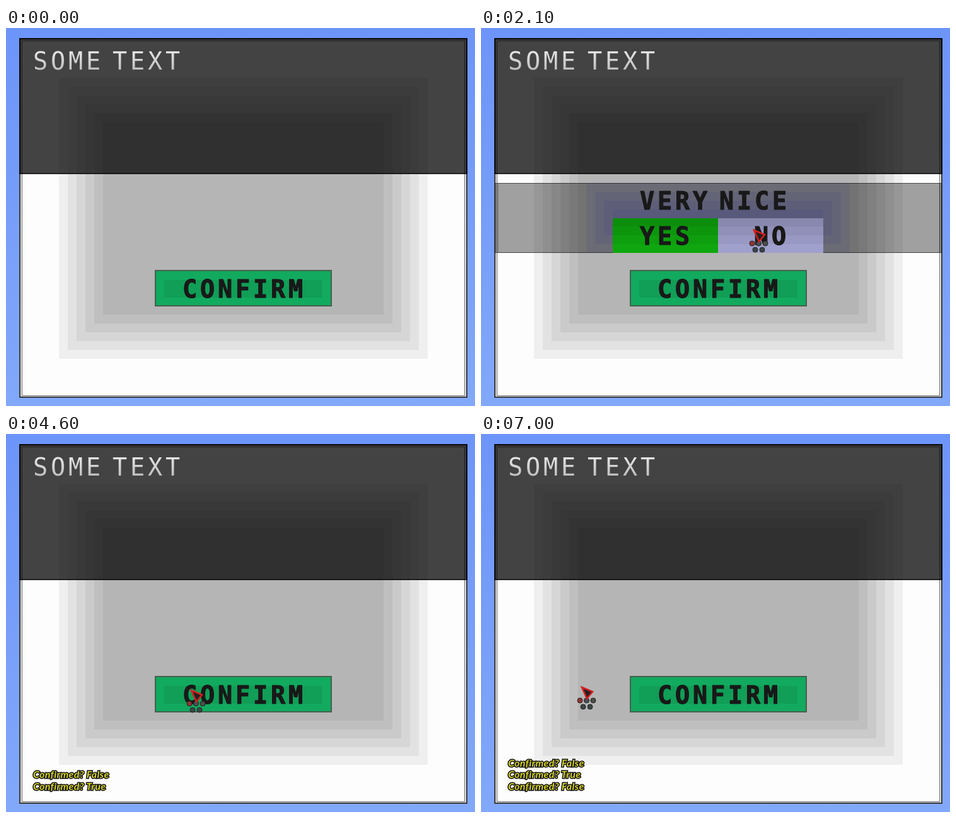
Write an HTML page that moves like this. It is 744 px wide and 600 px high and loops after 7.1 s.

```html
<!DOCTYPE html>
<html lang="en">
<head>
<meta charset="utf-8">
<style>
  html, body { margin: 0; width: 100%; height: 100%; overflow: hidden; }
  svg { display: block; }
  rect { shape-rendering: crispEdges; }
  .pixel { font: bold 38.4px "DejaVu Sans Mono", monospace; letter-spacing: 4.9px; word-spacing: -14px; fill: #191919; stroke: #151515; stroke-width: 1px; }
  .title { font-weight: normal; fill: url(#metal); stroke: none; }
  .log { font: italic bold 16px Lato, sans-serif; letter-spacing: .35px; fill: #d8d42a; stroke: #111; stroke-width: 3px; paint-order: stroke; }
</style>
</head>
<body>
<svg id="stage" width="744" height="600" viewBox="0 0 744 600">
  <defs>
    <linearGradient id="sky" x2="0" y2="1">
      <stop stop-color="#6d94f8"/><stop offset="1" stop-color="#82a8fa"/>
    </linearGradient>
    <linearGradient id="metal" x2="0" y2="1">
      <stop stop-color="#eee"/><stop offset="1" stop-color="#b4b4b4"/>
    </linearGradient>
  </defs>
</svg>
<script>
const LOOP = 7100, STEP = 100;
const stage = document.getElementById('stage');

const rect = (x, y, w, h, fill, extra = '') =>
  `<rect x="${x}" y="${y}" width="${w}" height="${h}" fill="${fill}" ${extra}/>`;
const outline = (x, y, w, h, color, width = 1) =>
  rect(x, y, w, h, 'none', `stroke="${color}" stroke-width="${width}"`);
const text = (x, y, label, cls = 'pixel') => `<text x="${x}" y="${y}" class="${cls}">${label}</text>`;
const repeat = (n, draw) => Array.from({ length: n }, (_, i) => draw(i)).join('');

// Concentric translucent boxes, each inset by 14 px
const nested = (n, x, y, w, h, fill) =>
  repeat(n, i => rect(x + 14 * i, y + 14 * i, w - 28 * i, h - 28 * i, fill));

const panel =
  rect(0, 0, 744, 600, 'url(#sky)') +
  rect(21, 16, 711, 571, '#3a3a3a') +
  rect(23, 18, 707, 567, '#dedede') +
  rect(25, 20, 703, 564, '#777') +
  rect(26, 21, 701, 562, '#fdfdfd') +
  nested(6, 84, 79, 585, 446, 'rgba(0,0,0,.055)') +
  rect(21, 16, 711, 216, 'rgba(0,0,0,.735)') +
  outline(22, 17, 709, 214, 'rgba(0,0,0,.5)', 2) +
  text(43, 66, 'SOME TEXT', 'pixel title');

const confirmButton =
  rect(236, 384, 281, 58, '#46604f') +
  rect(238, 386, 277, 54, '#12aa5e') +
  rect(251, 400, 251, 28, 'rgba(0,0,0,.07)') +
  text(280, 428, 'CONFIRM');

const dialog =
  rect(22, 246, 709, 111, 'rgba(0,0,0,.37)') +
  outline(22.5, 246.5, 708, 110, 'rgba(0,0,0,.4)') +
  outline(27.5, 246.5, 700, 110, 'rgba(0,0,0,.25)') +
  nested(4, 167, 246, 418, 111, 'rgba(48,48,140,.11)') +
  rect(209, 302, 167, 55, '#0fa60f', 'id="yes"') +
  rect(376, 302, 167, 55, '#b41212', 'id="no"') +
  repeat(3, i => rect(209, 302, 334, 13 + 14 * i, 'rgba(0,0,0,.05)')) +
  `<g id="bars">${repeat(12, i => rect(203 + 14 * i, 302, 3, 55, '#222228') +
    rect(206 + 14 * i, 302, 4, 55, 'rgba(190,190,190,.6)'))}</g>` +
  text(252, 288, 'VERY NICE') + text(252, 344, 'YES') + text(433, 344, 'NO');

const dot = (x, y, fill) => `<circle cx="${x}" cy="${y}" r="4" fill="${fill}" stroke="#222" stroke-width="1"/>`;
const pointer =
  dot(-2, 22, '#943434') + dot(8.5, 22, '#4a5052') + dot(19, 22, '#4b4f46') +
  dot(3, 32, '#3c4648') + dot(14, 32, '#3c4648') +
  '<path d="M1 1L18 8L9 19Z" fill="#222" stroke="#d81e1e" stroke-width="2.5"/>';

stage.insertAdjacentHTML('beforeend',
  panel + `<g id="dialog">${dialog}</g>` + confirmButton +
  `<g id="log"></g><g id="pointer">${pointer}</g>`);

const [dialogEl, yes, no, bars, log, pointerEl] =
  ['dialog', 'yes', 'no', 'bars', 'log', 'pointer'].map(id => document.getElementById(id));

// Pointer tip: time, x, y
const path = [
  [200, 760, 610], [1000, 394, 434], [1200, 388, 412], [1500, 388, 410],
  [2100, 432, 320], [2400, 434, 324], [2800, 400, 376], [3000, 392, 405],
  [3300, 390, 407], [3800, 331, 329], [4100, 328, 327], [4700, 290, 412],
  [5300, 277, 417], [5900, 430, 324], [6200, 432, 326], [7000, 159, 401]
];
// Dialog sessions: opened, closed, answer
const sessions = [[1400, 2400, 'False'], [3200, 4100, 'True'], [5100, 6200, 'False']];

function tipAt(t) {
  const next = path.findIndex(p => p[0] >= t);
  if (next < 1) return path[0].slice(1);
  const [t0, x0, y0] = path[next - 1], [t1, x1, y1] = path[next];
  const u = (t - t0) / (t1 - t0), k = u * u * (3 - 2 * u);
  return [x0 + (x1 - x0) * k, y0 + (y1 - y0) * k];
}

const show = (el, visible) => el.setAttribute('visibility', visible ? 'inherit' : 'hidden');

function draw(t) {
  const [x, y] = tipAt(t).map(Math.round);
  const over = (left, right) => x >= left && x < right && y >= 302 && y < 357;
  const onYes = over(209, 376), onNo = over(376, 543);
  pointerEl.setAttribute('transform', `translate(${x} ${y})`);
  show(dialogEl, sessions.some(([open, close]) => t >= open && t < close));
  show(bars, onYes);
  yes.setAttribute('fill', onYes ? '#a0a0cc' : '#0fa60f');
  yes.setAttribute('x', onYes ? 203 : 209);
  yes.setAttribute('width', onYes ? 173 : 167);
  no.setAttribute('fill', onNo ? '#a0a0cc' : '#b41212');
  const answers = sessions.filter(s => t >= s[1]);
  log.innerHTML = answers.map((s, i) =>
    text(43, 564.5 - 18.5 * (answers.length - 1 - i), 'Confirmed? ' + s[2], 'log')).join('');
}

function tick() {
  draw(Math.floor(performance.now() % LOOP / STEP) * STEP);
  requestAnimationFrame(tick);
}
tick();
</script>
</body>
</html>
```
